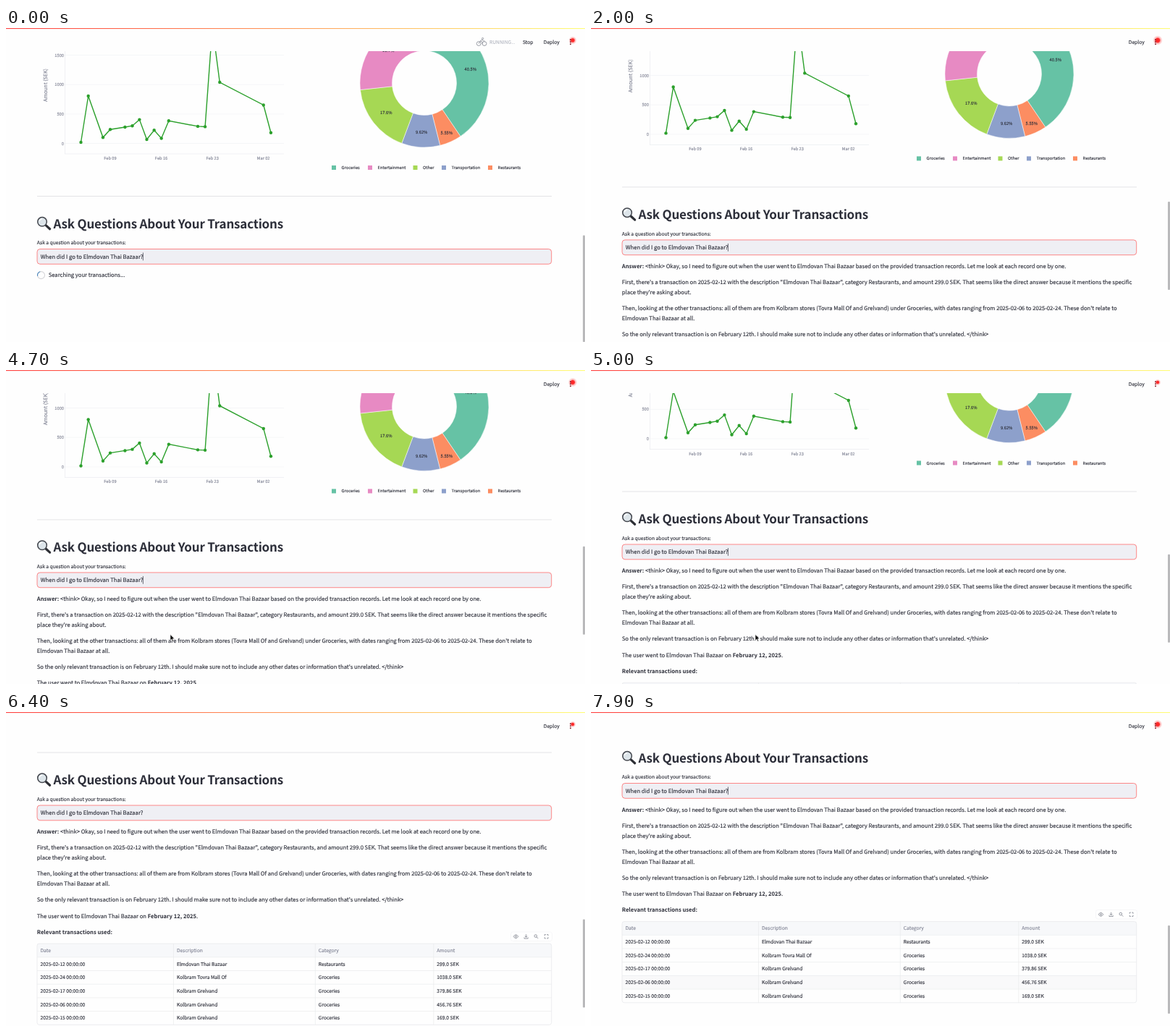
These frames come from a looping animation (800 by 434 pixels, 8000 ms). An HTML page:

```html
<!DOCTYPE html>
<html lang="en">
<head>
<meta charset="utf-8">
<title>Transactions</title>
<style>
  html, body { margin: 0; width: 100%; height: 100%; overflow: hidden; background: #fefefe; }
  svg { display: block; }
  text {
    font-family: "Noto Sans CJK JP", "Noto Sans CJK SC", "Noto Sans CJK", sans-serif;
    text-rendering: geometricPrecision;
    fill: #2c2e39;
    stroke: #2c2e39;
    stroke-width: .14;
    white-space: pre;
  }
  .b { font-weight: 700; stroke: none; }
  .grey { fill: #808495; stroke: #808495; }
  .pale { fill: #a3a8b4; stroke: none; }
  .icon { fill: none; stroke: #7d808c; stroke-width: .8; }
</style>
</head>
<body>
<svg id="stage" width="800" height="434" viewBox="0 0 800 434"></svg>
<script>
const BODY = 7.65, SMALL = 6.69, TINY = 5.74;
const range = n => [...Array(n).keys()];

// Text placed by the vertical centre of its capitals
const text = (x, y, str, size = BODY, attrs = '') =>
  `<text x="${x}" y="${y + size * .36}" font-size="${size}" ${attrs}>${str}</text>`;
const line = (x1, y1, x2, y2, color, width = .6) =>
  `<path d="M${x1} ${y1}L${x2} ${y2}" stroke="${color}" stroke-width="${width}"/>`;
const rect = (x, y, w, h, fill, attrs = '') =>
  `<rect x="${x}" y="${y}" width="${w}" height="${h}" fill="${fill}" ${attrs}/>`;
const circle = (x, y, r, attrs = '') => `<circle cx="${x}" cy="${y}" r="${r}" ${attrs}/>`;

function lineChart() {
  const points = [
    [103.5, 158], [113.7, 94], [134, 151.3], [144, 140.2], [164.4, 137], [174.5, 135.2],
    [184.4, 126.6], [194.5, 154], [204.7, 141.3], [214.7, 152.5], [224.9, 128.2], [265, 135.9],
    [275.1, 136.4], [285.2, -2], [295.3, 75], [355.8, 106.5], [366, 144.8]];
  const grid = range(4).map(i => {
    const y = 159.5 - i * 40.65;
    return line(82, y, 384, y, '#eff0f3') +
      text(80, y, i * 500, TINY, 'class="grey" text-anchor="end"');
  }).join('');
  const days = ['Feb 09', 'Feb 16', 'Feb 23', 'Mar 02'].map((day, i) =>
    text(144 + i * 70.56, 180, day, TINY, 'class="grey" text-anchor="middle"')).join('');
  return grid + days + line(81.5, 0, 81.5, 174, '#e6e7ec') + line(81, 174, 384, 174, '#e6e7ec') +
    `<g transform="translate(54.5 79) rotate(-90)">${
      text(0, 0, 'Amount (SEK)', 7.1, 'class="grey" text-anchor="middle"')}</g>` +
    `<polyline points="${points.join(' ')}" fill="none" stroke="#2ca02c" stroke-width="1.4"/>` +
    `<g fill="#2ca02c">${points.map(([x, y]) => circle(x, y, 2.2)).join('')}</g>`;
}

function donut() {
  const slices = [
    ['40.5%', 40.53, '#66c2a5', 66.7], ['5.55%', 5.55, '#fc8d62', 75.5], ['9.62%', 9.62, '#8da0cb', 68.5],
    ['17.6%', 17.6, '#a6d854', 66.7], ['26.7%', 26.7, '#e78ac3', 66.7]];
  const at = (share, r) => {
    const a = share / 100 * 2 * Math.PI;
    return [578 + r * Math.sin(a), 76 - r * Math.cos(a)];
  };
  let from = 0, shapes = '', labels = '';
  for (const [label, share, color, r] of slices) {
    const to = from + share, [x, y] = at(from + share / 2, r);
    shapes += `<path fill="${color}" stroke="#fff" stroke-width=".5" d="M${at(from, 89)}A89 89 0 0 1 ${
      at(to, 89)}L${at(to, 44.5)}A44.5 44.5 0 0 0 ${at(from, 44.5)}Z"/>`;
    labels += text(x, y, label, TINY, 'text-anchor="middle"');
    from = to;
  }
  const legend = [
    [450, 'Groceries', '#66c2a5'], [500, 'Entertainment', '#e78ac3'], [562.5, 'Other', '#a6d854'],
    [602, 'Transportation', '#8da0cb'], [666, 'Restaurants', '#fc8d62']
  ].map(([x, name, color]) => rect(x, 190, 6, 6, color) + text(x + 13.6, 193, name, TINY)).join('');
  return shapes + labels + legend;
}

function magnifier() {
  return `<path d="M55 272.6L60.6 277.7" stroke="#2d2f35" stroke-width="3.2" stroke-linecap="round"/>` +
    circle(50, 267.8, 6.3, 'fill="#dde5ea" stroke="#44474e" stroke-width="1.5"') +
    '<path d="M46.3 267a4.2 4.2 0 0 1 3.6-3.4" fill="none" stroke="#fff" stroke-width="1.3"/>';
}

function question() {
  return line(43, 232.5, 754, 232.5, '#dcdce0', .8) + magnifier() +
    text(65.6, 270.6, 'Ask Questions About Your Transactions', 17, 'class="b" letter-spacing="-.2"') +
    text(42.8, 296.9, 'Ask a question about your transactions:', SMALL) +
    rect(43, 305.5, 710.7, 20.8, '#efeff4', 'rx="4" stroke="#ff4b4b" stroke-width=".65"') +
    text(47.8, 315.9, 'When did I go to Elmdovan Thai Bazaar?') +
    `<g id="caret">${line(189.4, 310.5, 189.4, 321.3, '#31333f', .7)}</g>`;
}

function answer() {
  const bold = s => `<tspan class="b">${s}</tspan>`;
  const paragraphs = [
    [341.9, bold('Answer:') + ' &lt;think&gt; Okay, so I need to figure out when the user went to Elmdovan Thai Bazaar based on the provided transaction records. Let me look at each record one by one.'],
    [364.1, 'First, there\'s a transaction on 2025-02-12 with the description "Elmdovan Thai Bazaar", category Restaurants, and amount 299.0 SEK. That seems like the direct answer because it mentions the specific'],
    [377.9, 'place they\'re asking about.'],
    [400.1, 'Then, looking at the other transactions: all of them are from Kolbram stores (Tovra Mall Of and Grelvand) under Groceries, with dates ranging from 2025-02-06 to 2025-02-24. These don\'t relate to'],
    [413.9, 'Elmdovan Thai Bazaar at all.'],
    [436.1, 'So the only relevant transaction is on February 12th. I should make sure not to include any other dates or information that\'s unrelated. &lt;/think&gt;'],
    [458.3, `The user went to Elmdovan Thai Bazaar on ${bold('February 12, 2025')}.`],
    [480.7, bold('Relevant transactions used:')]];
  return paragraphs.map(([y, str]) => text(42.8, y, str)).join('') + table();
}

function table() {
  const top = 496.6, rowHeight = 18.7, bottom = top + 6 * rowHeight;
  const stamp = day => `2025-02-${day} 00:00:00`;
  const rows = [
    ['Date', 'Description', 'Category', 'Amount'],
    [stamp(12), 'Elmdovan Thai Bazaar', 'Restaurants', '299.0 SEK'],
    [stamp(24), 'Kolbram Tovra Mall Of', 'Groceries', '1038.0 SEK'],
    [stamp(17), 'Kolbram Grelvand', 'Groceries', '379.86 SEK'],
    [stamp('06'), 'Kolbram Grelvand', 'Groceries', '456.76 SEK'],
    [stamp(15), 'Kolbram Grelvand', 'Groceries', '169.0 SEK']];
  const columns = [43, 231.5, 427.3, 590.8], border = '#e6e7ea';
  return rect(43, top, 710.7, rowHeight, '#f7f8fa') +
    `<g id="hover">${rect(43, top + 4 * rowHeight, 710.7, rowHeight, '#f9f9fa')}</g>` +
    rows.map((cells, r) => cells.map((cell, c) =>
      text(columns[c] + 4.5, top + (r + .5) * rowHeight, cell, SMALL, r ? '' : 'class="grey"')).join('') +
      (r ? line(43, top + r * rowHeight, 753.7, top + r * rowHeight, border) : '')).join('') +
    columns.slice(1).map(x => line(x, top, x, bottom, border)).join('') +
    rect(43, top, 710.7, bottom - top, 'none', `rx="3" stroke="${border}" stroke-width=".7"`) +
    toolbar();
}

function toolbar() {
  return `<g id="toolbar" transform="translate(0 486.8)">${
    rect(697.5, -6.3, 57, 12.6, '#fff', 'rx="3" stroke="#f3f3f5" stroke-width=".7"')}
    <g class="icon">
      <path d="M701.2 0q3.3-5 6.6 0q-3.3 5-6.6 0Z"/>${circle(704.5, 0, 1)}
      <path d="M718.6-3v4M716.8-.6l1.8 1.8l1.8-1.8M716 1.2v1.6h5.2v-1.6"/>
      ${circle(731.8, -.7, 1.8)}<path d="M733.1 .6l2.2 2.2"/>
      <path d="M744.2-1v-1.7h1.7M747.3-2.7h1.7v1.7M749 1v1.7h-1.7M745.9 2.7h-1.7v-1.7"/>
    </g></g>`;
}

function header() {
  const cyclist = `<g fill="none" stroke="#8f929c" stroke-width=".9" stroke-linejoin="round">${
    circle(653.2, 21.6, 2.9) + circle(661, 21.6, 2.9) + circle(658.6, 14.6, 1.1)}
    <path d="M653.2 21.6l2.2-3.8l2.6 1.6v2.6M655.4 17.8l2.5-1.8l1.7 2h2"/></g>`;
  return rect(0, 0, 800, 32, '#fefefe') + rect(0, 0, 800, 1.2, 'url(#rainbow)') +
    `<g id="running">${cyclist}${text(668, 19.5, 'RUNNING...', SMALL, 'class="pale"')}${
      text(714, 19.5, 'Stop', SMALL)}</g>` +
    text(742.8, 19.5, 'Deploy', SMALL) +
    circle(783, 17, 5, 'id="pulse" fill="url(#glow)"') +
    `<g fill="#7c1520">${[16.2, 19.2, 22.2].map(y => circle(780, y, .95)).join('')}</g>`;
}

const $ = id => document.getElementById(id);
$('stage').innerHTML = `
  <defs>
    <linearGradient id="rainbow"><stop stop-color="#ff4b4b"/><stop offset="1" stop-color="#fffd80"/></linearGradient>
    <radialGradient id="glow">
      <stop stop-color="#ff2020"/><stop offset=".4" stop-color="#ff3030"/>
      <stop offset=".6" stop-color="#ff5050" stop-opacity=".4"/><stop offset="1" stop-color="#ff5050" stop-opacity="0"/>
    </radialGradient>
  </defs>
  <g id="page">${lineChart()}${donut()}${question()}
    <g id="waiting">
      ${circle(48.5, 341.6, 5, 'fill="none" stroke="#d6d6d9" stroke-width="1.1"')}
      <path id="spinner" d="M44.96 338.06A5 5 0 0 1 52.04 338.06" fill="none" stroke="#4a86bd" stroke-width="1.1"/>
      ${text(58.7, 341.7, 'Searching your transactions...')}
    </g>
    <g id="answer">${answer()}</g>
  </g>
  ${header()}
  <rect id="thumb" x="797" width="3" rx="1.2" fill="#b9b9bb"/>
  <path id="pointer" d="M227 365.6v8.2l1.9-1.7l1.3 2.9l1.3-.6l-1.3-2.8h2.6Z" fill="#000" stroke="#fff" stroke-width=".6"/>`;

const ANSWERED = 1400;
const scrollKeys = [
  [ANSWERED, 12.6], [4600, 12.6], [5000, 64.5], [5400, 140], [5700, 168],
  [6000, 168], [6400, 176.5], [6800, 196], [7300, 207], [8000, 207]];

function scrollAt(t) {
  if (t < ANSWERED) return 0;
  const i = scrollKeys.findIndex(([time]) => time > t);
  const [t0, s0] = scrollKeys[i - 1], [t1, s1] = scrollKeys[i];
  return s0 + (s1 - s0) * (t - t0) / (t1 - t0);
}

const show = (id, on) => $(id).setAttribute('visibility', on ? 'inherit' : 'hidden');

function draw() {
  const t = Math.floor(performance.now() % 8000 / 100) * 100;
  const answered = t >= ANSWERED, scroll = scrollAt(t);
  $('page').setAttribute('transform', `translate(0 ${-scroll})`);
  show('running', !answered);
  show('waiting', !answered);
  show('answer', answered);
  show('caret', (t + 400) % 1000 < 500);
  show('pointer', t >= 4300 && t < 6000);
  show('toolbar', answered && t >= 5600);
  show('hover', answered && t >= 6900);
  $('spinner').setAttribute('transform', `rotate(${t * .36 - 60} 48.5 341.6)`);
  $('pulse').setAttribute('r', 5.6 - 1.4 * Math.sin(t / 1200 * 2 * Math.PI));
  $('thumb').setAttribute('y', answered ? 240 + (scroll - 12.6) * .283 : 286.5);
  $('thumb').setAttribute('height', answered ? 122 : 147.5);
  requestAnimationFrame(draw);
}
draw();
</script>
</body>
</html>
```
